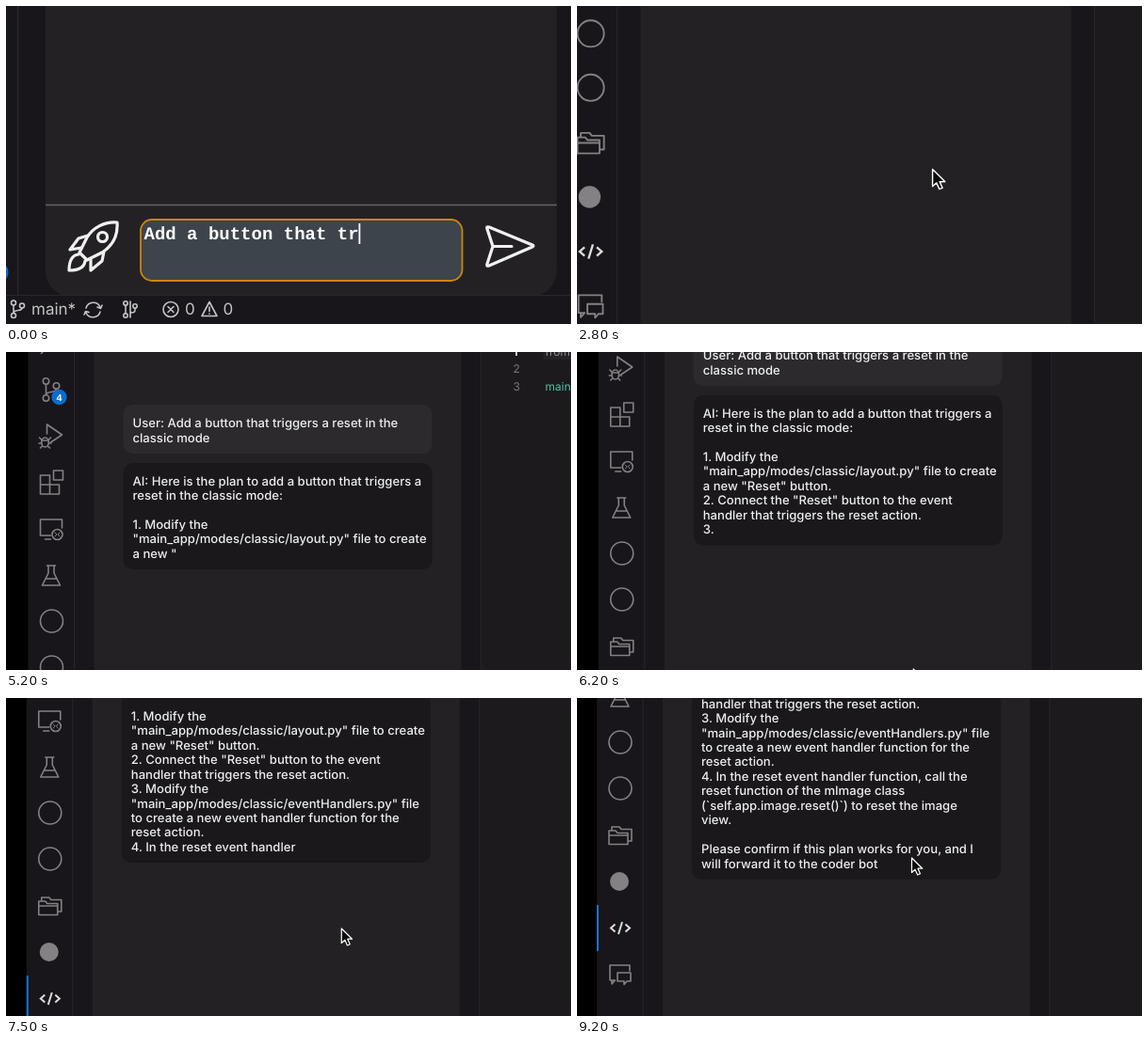
An HTML page that plays this animation: 600 px wide and 338 px high, repeating every 9.3 s.

```html
<!DOCTYPE html>
<html>
<head>
<meta charset="utf-8">
<style>
html, body { margin: 0; width: 100%; height: 100%; overflow: hidden; background: #000; }
svg { display: block; width: 600px; height: 338px; }
text { font-family: Inter, "Open Sans", sans-serif; white-space: pre; text-rendering: geometricPrecision; }
.chat { font-size: 13.1px; font-weight: 500; fill: #ededee; }
.mono { font-family: "DejaVu Sans Mono", monospace; font-size: 12px; }
.input { font: bold 19px "Liberation Mono", monospace; fill: #fff; }
.status { font-size: 17px; fill: #c4c4c6; }
.line { fill: none; stroke: #838184; stroke-width: 1.6; stroke-linejoin: round; stroke-linecap: round; }
.bold { fill: none; stroke: #f0f0f0; stroke-width: 3.2; stroke-linejoin: round; stroke-linecap: round; }
</style>
</head>
<body>
<svg viewBox="0 0 600 338">
  <rect width="600" height="338" fill="#000"/>
  <g id="world">
    <rect x="24" y="-80" width="900" height="900" fill="#18161a"/>
    <rect x="505" y="-80" width="420" height="900" fill="#1c1a1d"/>
    <path d="M73 -80V900M505 -80V900" stroke="#29272b" fill="none"/>
    <rect x="94" y="-12" width="390" height="778" rx="20" fill="#232124"/>

    <g class="line">
      <path d="M38 -20V0H52V-7M43 -22H55V-7H43Z"/>
      <g transform="translate(49 38)"><circle cx="3.5" cy="-4" r="7.5"/><path d="M-2 2L-11 11.5"/></g>
      <g transform="translate(48 88)">
        <circle cx="-5" cy="-9" r="3.2"/><circle cx="-5" cy="9" r="3.2"/><circle cx="6" cy="-4" r="3.2"/>
        <path d="M-5 -5.5V5.5M6 -1C6 4 -3 1 -5 5"/>
      </g>
      <g transform="translate(48 137)">
        <path d="M-4 -2V-12L12 -1 0 7"/>
        <ellipse cx="-6" cy="7" rx="3.8" ry="5"/>
        <path d="M-10 4L-12 2M-2 4L0 2M-10 8H-12.5M-2 8H.5M-9 11L-11 13M-3 11L-1 13M-9.5 5H-2.5"/>
      </g>
      <path d="M37 179H47V199H37ZM37 189H57V199H47M51 174H61V184H51Z"/>
      <g transform="translate(48 236)">
        <path d="M0 7H-11V-10H12V-1M-6 11H0"/><circle cx="7" cy="6" r="5.5"/>
        <path d="M4.5 4L6.5 6 4.5 8M9.5 4L7.5 6 9.5 8" stroke-width="1"/>
      </g>
      <path d="M44 275H53M45.5 275V283L39 296H58L51.5 283V275M42.5 289H54.5"/>
      <circle cx="49" cy="334" r="12"/>
      <circle cx="49" cy="383" r="12"/>
      <path d="M37 442.5V428H44L46 430.5H57V442.5ZM40 428V424H48L50 426.5H61V439H57M37 433H57"/>
      <path d="M43 587H38V571H59V577M40 587V591L43.5 587M46 579H60V588H56L53 591.5V588H46Z"/>
    </g>
    <circle cx="48" cy="482" r="10" fill="#838184"/>
    <path d="M43.5 527.5L39 531.5 43.5 535.5M54.5 527.5L59 531.5 54.5 535.5M51 525L47 538" fill="none" stroke="#dcdcdc" stroke-width="2"/>
    <rect x="24" y="507" width="2" height="49" fill="#0a78dc"/>
    <circle cx="57" cy="96" r="8.2" fill="#0a6cce"/>
    <text x="57" y="99.5" font-size="9.5" font-weight="700" fill="#fff" text-anchor="middle">4</text>

    <circle cx="532" cy="11" r="5.5" fill="#3b88b8"/>
    <text x="544.5" y="16" font-size="13" fill="#a9a9ab">VolumeApp.py</text>
    <text x="573" y="34" font-size="10.5" fill="#858587">Niko</text>
    <rect x="571" y="38" width="300" height="18" fill="#252326"/>
    <g class="mono" fill="#77777a">
      <text x="539" y="51.5" fill="#e0e0e0" font-weight="700">1</text>
      <text x="539" y="70">2</text>
      <text x="539" y="88.5">3</text>
      <text x="573" y="51.5" fill="#918a8d">from app</text>
      <text x="573" y="88.5" fill="#4bbfa4">main</text>
    </g>

    <g fill="#fff">
      <path transform="translate(230.8 19.8) scale(1.1)" d="M17.65 6.35A7.96 7.96 0 0 0 12 4c-4.42 0-7.99 3.58-7.99 8s3.57 8 7.99 8c3.73 0 6.84-2.55 7.73-6h-2.08A5.99 5.99 0 0 1 12 18c-3.31 0-6-2.69-6-6s2.69-6 6-6c1.66 0 3.14.69 4.22 1.78L13 11h7V4z"/>
      <rect x="303" y="26.5" width="13" height="13"/>
      <path transform="translate(363 21)" fill-rule="evenodd" d="M12 4.5C7 4.5 2.73 7.61 1 12c1.73 4.39 6 7.5 11 7.5s9.27-3.11 11-7.5c-1.73-4.39-6-7.5-11-7.5zM12 17a5 5 0 1 1 0-10 5 5 0 0 1 0 10zm0-8a3 3 0 1 0 0 6 3 3 0 0 0 0-6z"/>
      <g transform="translate(437.5 30)" fill="none" stroke="#fff" stroke-width="2.2"><circle r="5.8"/><path d="M4.2 4.2L11.5 11.5"/></g>
    </g>

    <g id="talk">
      <rect x="125" y="104" width="328" height="52" rx="10" fill="#2c2a2d"/>
      <text class="chat" x="135" y="128.2">User: Add a button that triggers a reset in the</text>
      <text class="chat" x="135" y="143.6">classic mode</text>
      <g id="reply"><rect id="bubble" x="125" y="166" width="328" rx="10" fill="#1a181b"/></g>
    </g>

    <!-- lower part, drawn at the opening zoom -->
    <g transform="scale(.71839) translate(89 757)">
      <path d="M42 211.5H585" stroke="#656367" stroke-width="1.6"/>
      <g class="bold">
        <path d="M118 230C104 229 92 236 86 246L78 262 86 270 102 262C113 255 119 244 118 230Z"/>
        <circle cx="102.5" cy="245.5" r="5"/>
        <path d="M87 244L77 247 68 259 80 257M104 261L102 271 90 281V269M77 264C69 265 67 272 67 281 76 281 83 279 84 271"/>
        <path d="M513 235L559 254Q561 255 559 256L513 276Q510 277 511 274L517 255.5 511 237Q510 234 513 235ZM517 255.5H537"/>
      </g>
      <rect x="143" y="227" width="341.5" height="65" rx="12" fill="#3d444b" stroke="#c9860f" stroke-width="1.8"/>
      <text id="row0" class="input" x="146.5" y="248.5"></text>
      <text id="row1" class="input" x="146.5" y="270"></text>
      <rect id="caret" width="1.8" height="22" fill="#fff"/>
      <circle cx="-9" cy="283" r="11.5" fill="#0a6cce"/>
      <rect x="-56" y="307" width="1400" height="40" fill="#18161a"/>
      <path d="M-56 307.5H1344" stroke="#2b292d"/>
      <g class="status">
        <text x="27" y="328.5">main*</text><text x="190" y="328.5">0</text><text x="230.5" y="328.5">0</text>
      </g>
      <g class="line" style="stroke:#c4c4c6">
        <circle cx="8" cy="315.5" r="2.5"/><circle cx="8" cy="329" r="2.5"/><circle cx="17" cy="318.5" r="2.5"/>
        <path d="M8 318V326.5M17 321C17 325 9 322 8 326"/>
        <path d="M85 321A8 8 0 0 1 100 320M100 325A8 8 0 0 1 85 326M97 320L100.5 321.5 102 318M88 325.5L84.5 324.5 83 328"/>
        <path d="M127 318V327M132 314V331M132 326C138 326 137 324 137 321"/>
        <circle cx="127" cy="316" r="2.2"/><circle cx="127" cy="329" r="2.2"/><circle cx="137" cy="319" r="2.2"/>
        <circle cx="175" cy="322.5" r="8"/><path d="M172 319.5L178 325.5M178 319.5L172 325.5"/>
        <path d="M216 314.5L224 329.5H208ZM216 320V324.5M216 327V327.2"/>
      </g>
    </g>
    <path id="mouse" d="M0 0V15.5L3.6 12.2 6.2 18 9 16.8 6.5 11.2H11.3Z" fill="#0b0b0c" stroke="#fff" stroke-width="1.2" stroke-linejoin="round"/>
  </g>
</svg>
<script>
const LOOP = 9300, STEP = 100;
const ROW = 15.44, ZOOM = 1.392, START = [-89, -757];
const $ = id => document.getElementById(id);

const prompt = 'Add a button that triggers a\nreset in the classic mode';
const answer = `AI: Here is the plan to add a button that triggers a
reset in the classic mode:

1. Modify the
"main_app/modes/classic/layout.py" file to create
a new "Reset" button.
2. Connect the "Reset" button to the event
handler that triggers the reset action.
3. Modify the
"main_app/modes/classic/eventHandlers.py" file
to create a new event handler function for the
reset action.
4. In the reset event handler function, call the
reset function of the mImage class
(\`self.app.image.reset()\`) to reset the image
view.

Please confirm if this plan works for you, and I
will forward it to the coder bot`;

const after = s => answer.indexOf(s) + s.length;
const progress = [
  [3700, 0], [4400, after('classic mode')], [5200, after('a new "')],
  [6200, after('\n3.')], [7500, after('4. In the reset event handler')], [9200, answer.length]
];
const pan = [[4000, -5], [4400, 0], [5200, 48], [6200, 120], [7500, 212], [9200, 287]];

// token ends, so the reply grows word by word
const stops = [];
for (const m of answer.matchAll(/\s*\w+|\s*[^\s\w]+/g)) stops.push(m.index + m[0].length);

const rows = answer.split('\n').map((_, i) => {
  const el = document.createElementNS('http://www.w3.org/2000/svg', 'text');
  el.setAttribute('class', 'chat');
  el.setAttribute('x', 135);
  el.setAttribute('y', 189.6 + i * ROW);
  return $('reply').appendChild(el);
});

const clamp = u => Math.max(0, Math.min(1, u));
const smooth = u => u * u * (3 - 2 * u);
const mix = (a, b, u) => a + (b - a) * u;
const span = (t, a, b) => clamp((t - a) / (b - a));

function segment(keys, t) {
  let i = 0;
  while (i < keys.length - 2 && t >= keys[i + 1][0]) i++;
  return [i, span(t, keys[i][0], keys[i + 1][0])];
}

function linear(keys, t) {
  const [i, u] = segment(keys, t);
  return mix(keys[i][1], keys[i + 1][1], u);
}

function curve(keys, t) {
  const [i, u] = segment(keys, t);
  const slope = k => {
    const a = keys[Math.max(0, k - 1)], b = keys[Math.min(keys.length - 1, k + 1)];
    return (b[1] - a[1]) / (b[0] - a[0]);
  };
  const d = keys[i + 1][0] - keys[i][0], v = 1 - u;
  return mix(keys[i][1], keys[i + 1][1], smooth(u))
    + d * u * v * (v * slope(i) - u * slope(i + 1));
}

function camera(t) {
  const p = smooth(Math.pow(span(t, 2100, 3700), 0.81));
  const y = curve(pan, t);
  const x = -Math.max(0, y) * 0.0105;
  const s = Math.pow(ZOOM, 1 - p);
  $('world').setAttribute('transform',
    `translate(${mix(START[0], x, p)} ${mix(START[1], -y, p)}) scale(${s})`);
}

function typing(t) {
  const n = Math.round(mix(20, prompt.length, span(t, 0, 1800)));
  const lines = (t < 2100 ? prompt.slice(0, n) : '').split('\n');
  const last = lines.length - 1;
  $('row0').textContent = lines[0];
  $('row1').textContent = lines[1] || '';
  $('caret').setAttribute('x', 146.5 + lines[last].length * 11.4);
  $('caret').setAttribute('y', 231 + last * 21.5);
}

function reply(t) {
  const n = linear(progress, t) + 0.01;
  const end = stops.filter(s => s <= n).pop() || 0;
  const lines = answer.slice(0, end).split('\n');
  rows.forEach((el, i) => { el.textContent = lines[i] || ''; });
  $('bubble').setAttribute('height', 20.5 + lines.length * ROW);
  $('reply').style.display = end ? '' : 'none';
  $('talk').style.display = t >= 2100 ? '' : 'none';
}

function mouse(t) {
  const a = smooth(span(t, 1700, 2000)), b = smooth(span(t, 2100, 2750));
  const x = mix(mix(402, 443, a), 358.5, b), y = mix(mix(739, 725, a), 457, b);
  $('mouse').setAttribute('transform', `translate(${x} ${y})`);
  $('mouse').style.display = t >= 1700 ? '' : 'none';
}

function draw(now) {
  const t = Math.floor((now % LOOP) / STEP) * STEP;
  camera(t);
  typing(t);
  reply(t);
  mouse(t);
}

let begin;
function tick(now) {
  if (begin === undefined) begin = now;
  draw(now - begin);
  requestAnimationFrame(tick);
}
draw(0);
requestAnimationFrame(tick);
</script>
</body>
</html>
```
